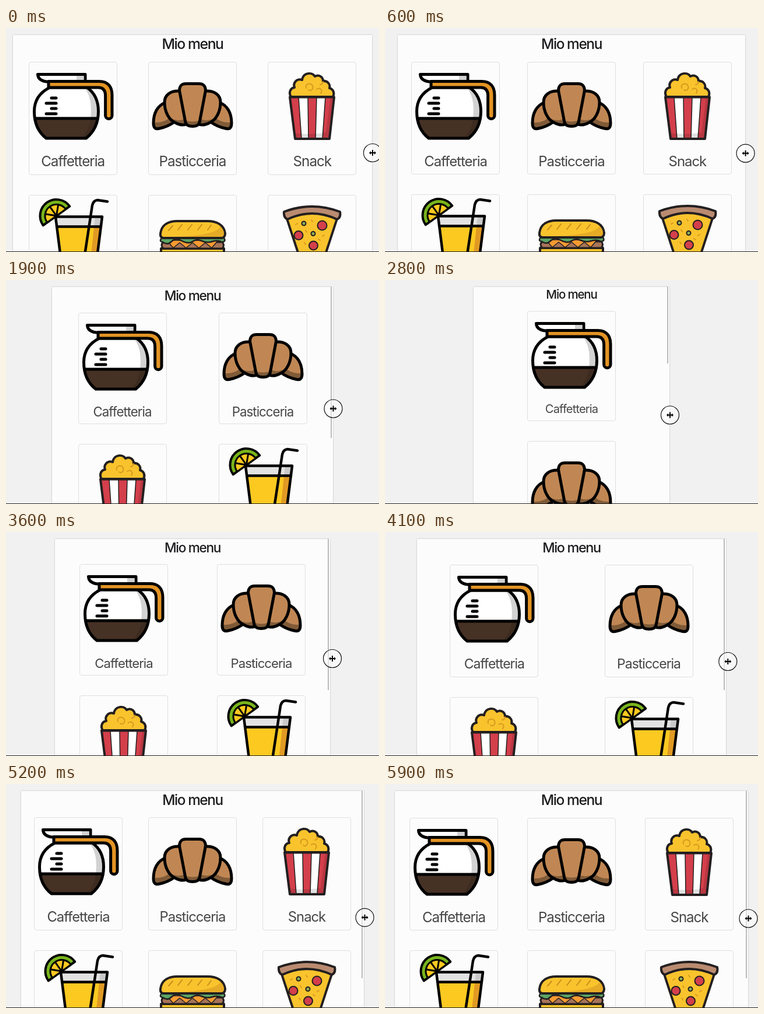
Animation, 640 px wide and 384 px high, one loop 6 s. Source, as an HTML page:

```html
<!DOCTYPE html>
<html lang="it">
<head>
<meta charset="utf-8">
<title>Mio menu</title>
<style>
  html, body { margin: 0; width: 640px; height: 384px; overflow: hidden; background: #f1f1f1; }
  body { position: relative; font-family: Inter, sans-serif; }
  #panel {
    position: absolute; top: 12px; height: 380px; overflow: hidden;
    background: #fcfcfc; box-shadow: 0 0 2px rgba(0, 0, 0, .28);
  }
  h1 {
    margin: 0 0 15.500px; padding-top: .8px; text-align: center; white-space: nowrap;
    font-size: 1em; line-height: 1.2; font-weight: 550; letter-spacing: -.058em; color: #1c1c1e;
  }
  #grid { display: grid; justify-items: center; row-gap: 34px; }
  .card {
    box-sizing: border-box; width: 152px; height: calc(164px + 1.2em);
    border: 1px solid #dfdfdf; border-radius: 4px; text-align: center;
  }
  .card svg { display: block; width: 152px; height: 152px; margin: -1px; }
  .card span {
    display: block; margin: 5px -10px 0; line-height: 1.2; white-space: nowrap;
    letter-spacing: -.042em; color: #464646;
  }
  .card span i { font-style: normal; font-size: .98em; }
  #thumb { position: absolute; right: 2px; top: 0; width: 2px; background: #bbb; }
  #floor { position: absolute; left: 0; top: 383px; width: 640px; height: 1px; background: #222; }
  #cursor { position: absolute; left: -17px; top: -17px; width: 34px; height: 34px; }
  .ink { stroke: #000; stroke-width: 5; stroke-linejoin: round; stroke-linecap: round; }
  .soft { stroke: #231f20; stroke-width: 4; stroke-linejoin: round; stroke-linecap: round; }
  .line { fill: none; }
</style>
</head>
<body>
<svg width="0" height="0" style="position:absolute">
  <symbol id="carafe" viewBox="0 0 152 152">
    <clipPath id="bowl"><path id="bowlShape" d="M36 44C18 53 9.500 67 9.500 85C9.500 107 17 121 30 131H98.500C111 121 119.500 107 119.500 85C119.500 66 113 53 100 44Z"/></clipPath>
    <g clip-path="url(#bowl)">
      <path fill="#fff" d="M0 40H130V97H0Z"/>
      <path fill="#d2d2d2" d="M91 40C104 52 109 69 106 97H130V40Z"/>
      <path fill="#463125" d="M0 97H130V135H0Z"/>
      <path fill="#3d2b20" d="M106 97C105 112 99 122 88 135H130V97Z"/>
    </g>
    <use href="#bowlShape" class="ink line"/>
    <path class="ink line" d="M11 97H118M39 62H47M30 71H47M39 80H47M30 89H47"/>
    <path class="ink" fill="#fff" d="M15.500 21.500H97V34H31C22 33 16 29 15.500 21.500Z"/>
    <path fill="#d2d2d2" d="M82 24H94.500V31.500H82Z"/>
    <path class="ink" fill="#e39424" d="M34 33.500H121C136 33.500 143 43 143 57V92A5.700 5.700 0 0 1 131.600 92V58C131.600 49 128 44 119 44H34Z"/>
  </symbol>

  <symbol id="croissant" viewBox="0 0 152 152">
    <g id="wing">
      <path fill="#c08754" d="M29 70C16 75 9 88 9 105C9 114 13 116 20 114C30 112 38 108 45 103Z"/>
      <path fill="#805b38" d="M10 104C24 105 35 99 39 93L45 103C38 108 30 112 20 114C13 116 10 114 10 104Z"/>
      <path class="ink line" d="M29 70C16 75 9 88 9 105C9 114 13 116 20 114C30 112 38 108 45 103"/>
      <path fill="#c08754" d="M54 50C38 49 28 57 28 69C28 85 35 99 46 104C53 108 60 109 65 107Z"/>
      <path fill="#805b38" d="M39 97C48 101 56 101 62 98L65 107C56 109 45 106 39 97Z"/>
      <path class="ink line" d="M54 50C38 49 28 57 28 69C28 85 35 99 46 104C53 108 60 109 65 107"/>
    </g>
    <use href="#wing" transform="matrix(-1 0 0 1 152 0)"/>
    <path id="heart" fill="#c08754" d="M53.500 49C54 41 57 37.500 65 37.500H87C95 37.500 98 41 98.500 49L88 104C86 109 83 110.500 76 110.500S66 109 64 104Z"/>
    <path fill="#805b38" d="M63.500 100Q76 105 88.500 100L87 105Q84 110 76 110T65 105Z"/>
    <use href="#heart" class="ink" style="fill-opacity:0"/>
  </symbol>

  <symbol id="popcorn" viewBox="0 0 152 152">
    <path class="soft" fill="#f9c32d" d="M40 60C36 54 38 45 46 44C43 36 50 28 59 31C61 18 76 17 81 25C88 21 95 26 95 33C102 32 108 38 106 45C113 47 115 54 112 60Z"/>
    <path fill="none" stroke="#d79a1f" stroke-width="2" stroke-linecap="round" d="M66 45C64 37 74 35 77 41C79 47 74 51 70 48M84 47C90 43 95 49 91 54M95 34Q94 39 90 39"/>
    <path fill="#fff" d="M38 60.500H114L106 132H47Z"/>
    <path fill="#d33f4b" stroke="#231f20" stroke-width="1.500" d="M38 60.500H53L58 132H47ZM69 60.500H84L82 132H70ZM99 60.500H114L106 132H94Z"/>
    <path fill="#000" opacity=".12" d="M108 60.500H114L106 132H47L46 122Q76 126 100 121Z"/>
    <path class="soft line" d="M38 60.500H114L106 132H47Z"/>
  </symbol>

  <symbol id="drink" viewBox="0 0 152 152">
    <path fill="#e2e2e2" d="M46 37H126L124 55H48Z"/>
    <path fill="#fcc921" d="M48 55H124L112 148H60Z"/>
    <path fill="#c9c9c9" d="M114 37H126L124 55H112Z"/>
    <path fill="#e09a24" d="M112 55H124L112 148H102Z"/>
    <path class="ink line" style="stroke-width:4.500" d="M46 37.500H126L112 148H60ZM48 54.500H124M95 110L109 18Q111 9.500 118 9L135 11.500"/>
    <g transform="translate(47.500 36) rotate(-35.600)" class="ink" style="stroke-width:4">
      <path fill="#79b51c" d="M-28 0A28 28 0 0 1 28 0Z"/>
      <path fill="#fcc921" stroke-width="3" d="M-19.500 0A19.500 19.500 0 0 1 19.500 0Z"/>
      <path class="line" stroke-width="3" d="M0 0L-13 -13M0 0V-18M0 0L13 -13"/>
    </g>
  </symbol>

  <symbol id="burger" viewBox="0 0 152 152">
    <path class="soft" fill="#f9c32d" d="M22 92H130V112Q126 126 110 126H42Q26 126 22 112Z"/>
    <path class="soft" fill="#a87458" style="stroke-width:3" d="M26 81H127Q132 86 127 92H26Q20 86 26 81Z"/>
    <path fill="#f79a32" stroke="#231f20" stroke-width="1.500" stroke-linejoin="round" d="M32 78H120L109 91L98 82L87 91L76 82L65 91L54 82L43 91Z"/>
    <path class="soft" fill="#5aa565" style="stroke-width:2.500" d="M23 74H130Q134 80 127 81Q119 77 110 80T92 79T76 80T58 79T40 80T25 81Q18 80 23 74Z"/>
    <path class="soft" fill="#f9c32d" d="M26 74Q20 73 21 66C23 51 35 45 50 45H102C117 45 130 51 132 66Q132 73 126 74Z"/>
    <path fill="#e5ab26" d="M124 55Q130 60 130 66Q130 72 124 72H28Q112 72 124 55Z"/>
    <path fill="none" stroke="#c98d1d" stroke-width="2" stroke-linecap="round" d="M42 53L35 61M58 51L51 60M75 51L68 60M92 51L85 60M108 52L102 60"/>
  </symbol>

  <symbol id="pizza" viewBox="0 0 152 152">
    <path class="soft" fill="#f9c32d" d="M33 41Q76 21 119 41L100 99Q91 128 76 136Q61 128 52 99Z"/>
    <path class="soft" fill="#ba8b70" d="M28 29Q76 11 124 29Q126 39 119 42Q76 22 34 42Q27 39 28 29Z"/>
    <g class="soft" style="stroke-width:2">
      <g fill="#d33f4b"><circle cx="93.500" cy="52.500" r="8"/><circle cx="53" cy="69.500" r="7.500"/><circle cx="78.500" cy="87" r="7.500"/></g>
      <g fill="#8fae5a"><circle cx="62" cy="49" r="3.500"/><circle cx="78" cy="66.500" r="3.500"/></g>
    </g>
    <path stroke="#d79a1f" stroke-width="2" stroke-linecap="round" d="M48 51L51 49M75 43L77 46M65 61L67 64M94 71L97 69M87 76L90 78M63 82L65 85"/>
  </symbol>
</svg>

<div id="panel"><h1>Mio menu</h1><div id="grid"></div><div id="thumb"></div></div>
<svg id="cursor" viewBox="-17 -17 34 34">
  <circle r="15.500" fill="#fff" fill-opacity=".5" stroke="#111" stroke-width="1.200"/>
  <path id="resize" fill="#000" stroke="#fff" stroke-width=".8" paint-order="stroke" d="M-6 0L-3 -3V-1H-1V-5H1V-1H3V-3L6 0L3 3V1H1V5H-1V1H-3V3Z"/>
  <path id="arrow" fill="#000" stroke="#fff" stroke-width=".8" d="M0 -1V9L2.300 7L4 11L5.500 10.300L4 6.500H7Z"/>
</svg>
<div id="floor"></div>

<script>
const $ = id => document.getElementById(id);
const LOOP = 6000, STEP = 100, CENTER = 320;
const THUMB = { 1: 131, 2: 259, 3: 321 };

// time, left edge of the panel, pointer x, pointer y
const drag = [
  [0, 12, 629, 214], [200, 12, 629, 214], [700, 24, 616, 215], [1100, 44, 591, 217],
  [1400, 68, 571, 219], [1900, 79, 561.5, 220.5], [2100, 104, 530, 223],
  [2800, 152, 489, 231.5], [3500, 89, 553, 218], [3600, 84, 560, 217],
  [4200, 49, 594, 223], [4600, 34, 607, 227], [4900, 32, 610, 228],
  [5600, 18, 623, 230], [5900, 17, 623.5, 230.5]
];

$("grid").innerHTML = [
  ["carafe", "Caffetteria"], ["croissant", "Pasticceria"], ["popcorn", "Snack"],
  ["drink", ""], ["burger", ""], ["pizza", ""]
].map(([icon, label]) =>
  `<div class="card"><svg><use href="#${icon}"/></svg><span><i>${label}</i></span></div>`).join("");

function pose(t) {
  const i = drag.findIndex(k => k[0] >= t), b = drag[i], a = drag[Math.max(0, i - 1)];
  const p = b === a ? 0 : (t - a[0]) / (b[0] - a[0]);
  return a.map((v, j) => v + (b[j] - v) * p).slice(1);
}

function draw(now) {
  const t = Math.floor(now % LOOP / STEP) * STEP;
  const [left, x, y] = pose(t);
  const width = 2 * (CENTER - left), right = left + width;
  const cols = width >= 541 ? 3 : width >= 406 ? 2 : 1;
  Object.assign($("panel").style, {
    left: left + "px", width: width + "px", fontSize: 15.5 + .015 * width + "px"
  });
  $("grid").style.gridTemplateColumns = `repeat(${cols}, 1fr)`;
  $("thumb").style.height = THUMB[cols] + "px";
  $("thumb").style.opacity = Math.min(1, Math.max(0, (t - 600) / 1300));
  $("cursor").style.transform = `translate(${x}px, ${y}px)`;
  const off = x < right - 3;
  $("arrow").style.display = off ? "" : "none";
  $("resize").style.display = off ? "none" : "";
  requestAnimationFrame(draw);
}
requestAnimationFrame(draw);
</script>
</body>
</html>
```
